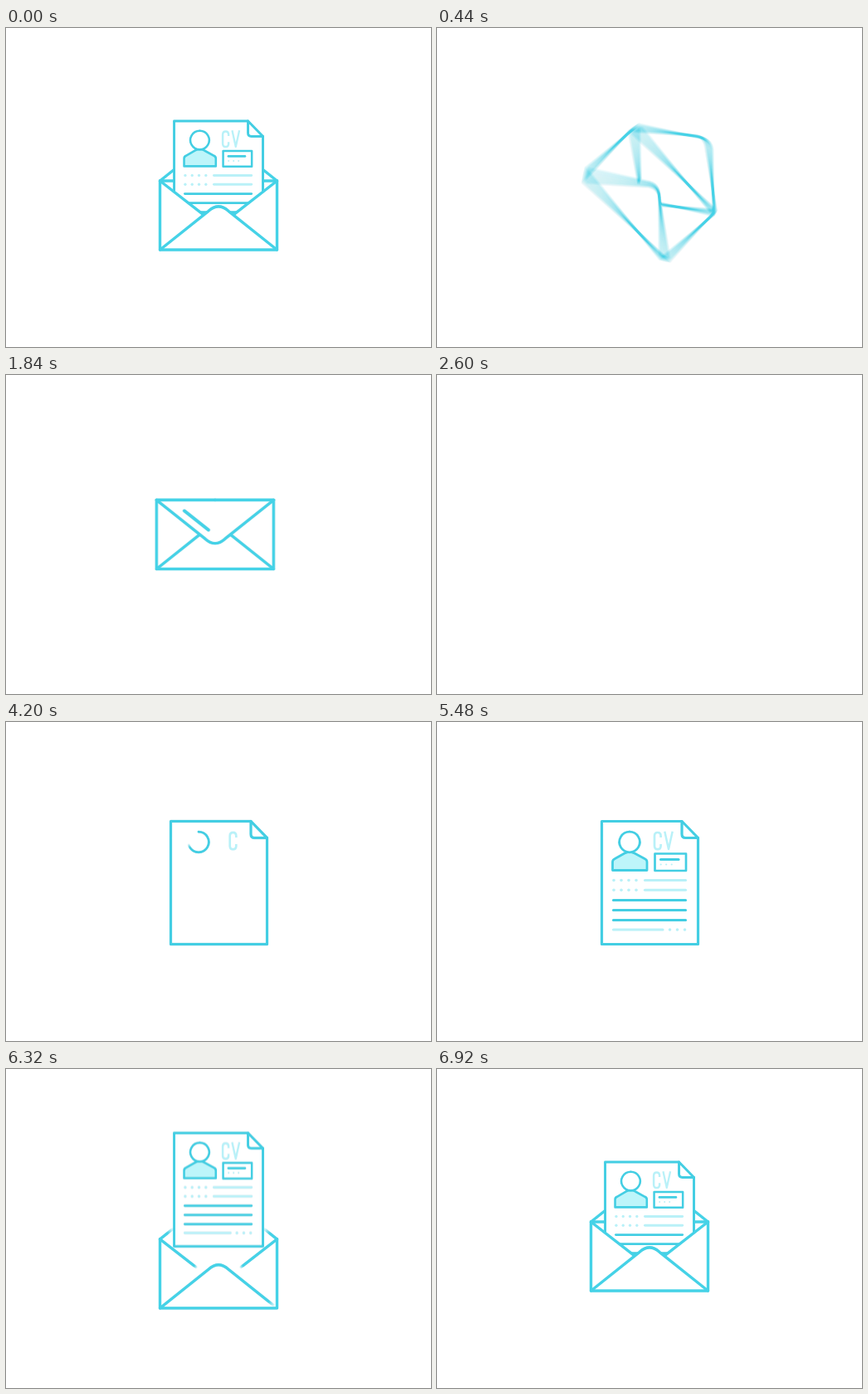
Write an HTML page with a canvas that moves like this. It is 512 px wide and 384 px high and loops after 7000 ms.

```html
<!DOCTYPE html>
<html lang="en">
<head>
<meta charset="utf-8">
<title>CV by mail</title>
<style>
html, body { margin: 0; width: 100%; height: 100%; overflow: hidden; background: #fff; }
canvas { display: block; width: 512px; height: 384px; }
</style>
</head>
<body>
<canvas id="stage" width="512" height="384"></canvas>
<script>
const W = 512, H = 384, LOOP = 7000;
const SHUTTER = 20, SAMPLES = 16;
const MAIN = '#43cee3', LIGHT = '#b9f1f8', FILL = '#bdf5fa', ENV = '#45d2e7';

const stage = document.getElementById('stage');
const ratio = Math.max(1, window.devicePixelRatio || 1);
stage.width = W * ratio;
stage.height = H * ratio;
const out = stage.getContext('2d');
const layer = document.createElement('canvas');
layer.width = stage.width;
layer.height = stage.height;
const g = layer.getContext('2d');

const clamp = v => Math.min(1, Math.max(0, v));
const ramp = (t, from, to) => clamp((t - from) / (to - from));
const cubic = u => u < .5 ? 4 * u ** 3 : 1 - 4 * (1 - u) ** 3;

// Smooth monotone curve through [time, value] keys.
function curve(...keys) {
  const n = keys.length;
  const slope = i => (keys[i + 1][1] - keys[i][1]) / (keys[i + 1][0] - keys[i][0]);
  const tangent = keys.map((_, i) => {
    if (i === 0 || i === n - 1) return 0;
    const a = slope(i - 1), b = slope(i);
    return a * b <= 0 ? 0 : 2 * a * b / (a + b);
  });
  return t => {
    if (t <= keys[0][0]) return keys[0][1];
    if (t >= keys[n - 1][0]) return keys[n - 1][1];
    let i = 0;
    while (t > keys[i + 1][0]) i++;
    const d = keys[i + 1][0] - keys[i][0], u = (t - keys[i][0]) / d;
    const e = u * u * (3 - 2 * u);
    return keys[i][1] * (1 - e) + keys[i + 1][1] * e +
      d * (tangent[i] * u * (1 - u) ** 2 - tangent[i + 1] * u * u * (1 - u));
  };
}

function shape(d) {
  const el = document.createElementNS('http://www.w3.org/2000/svg', 'path');
  el.setAttribute('d', d);
  return { path: new Path2D(d), len: el.getTotalLength() };
}

function fill(s, color) {
  g.fillStyle = color;
  g.fill(s.path);
}

// Strokes the first part p of a shape.
function stroke(s, color, width, p = 1, cap = 'round') {
  if (p <= 0) return;
  g.strokeStyle = color;
  g.lineWidth = width;
  g.lineCap = cap;
  g.lineJoin = 'round';
  g.setLineDash(p < 1 ? [s.len * p, s.len * 2] : []);
  g.stroke(s.path);
  g.setLineDash([]);
}

function dot(x, y, r, color, p) {
  if (p <= 0) return;
  g.fillStyle = color;
  g.beginPath();
  g.arc(x, y, r * p, 0, Math.PI * 2);
  g.fill();
}

// ---- the page ----
const sheet = shape('M198.5 267.5H314.5V139.5L295 119.5H198.5Z');
const fold = shape('M295 119.5V135Q295 139.5 299.5 139.5H314.5');
const head = shape('M232 132.2a12.3 12.3 0 1 1-.01 0');
const torso = shape('M211.5 178.5V168.5Q211.5 166 214 164.8L226 158Q232 154.5 238 158L250.5 164.8Q253 166 253 168.5V178.5Z');
const letterC = shape('M269.6 139V137.2Q269.6 133 265.8 133Q262 133 262 137.2V149Q262 153.2 265.8 153.2Q269.6 153.2 269.6 149V147');
const letterV = shape('M274.3 131.8L279 153L283.7 131.8');
const card = shape('M262.5 158.5H300V179H262.5Z');
const line = (x1, x2, y) => shape(`M${x1} ${y}H${x2}`);

const rules = [
  [line(269.5, 291, 165.5), MAIN, 4520],
  [line(250.5, 299.5, 190.5), LIGHT, 4640],
  [line(250.5, 299.5, 202.2), LIGHT, 4720],
  [line(212.5, 299.5, 214.5), MAIN, 4800],
  [line(212.5, 299.5, 226.5), MAIN, 4880],
  [line(212.5, 299.5, 238.5), MAIN, 4960],
  [line(212.5, 272, 250), LIGHT, 5040]
];
// x, y, gap, count, radius, start
const dotRows = [
  [269.7, 171.5, 6.5, 3, 1.1, 4600],
  [213, 190.5, 9, 4, 1.8, 4560],
  [213, 202.2, 9, 4, 1.8, 4640],
  [280.5, 250, 9, 3, 1.8, 5180]
];

const pageTop = curve([0, 112], [80, 110], [330, 242], [3340, 179], [3700, 152],
  [4040, 129.5], [4200, 119.5], [4760, 117], [5480, 119.5], [5540, 119.5], [6060, 66],
  [6200, 69.5], [6320, 77], [6480, 100], [6680, 112], [7000, 112]);
const pageScale = curve([5540, 1], [5960, .922]);

function drawPage(t) {
  const done = t < 340;
  const grow = (from, time) => done ? 1 : ramp(t, from, from + time);
  const k = done ? .922 : pageScale(t);
  g.save();
  g.translate(256.5 - (1 - k) * 6, pageTop(t));
  g.scale(k, k);
  g.translate(-256.5, -119.5);

  fill(sheet, '#fff');
  stroke(sheet, MAIN, 3.2, grow(3345, 640));
  stroke(fold, MAIN, 3.2, grow(3900, 220));

  const body = grow(4230, 300);
  g.globalAlpha = grow(4450, 160);
  fill(torso, FILL);
  g.globalAlpha = 1;
  stroke(torso, MAIN, 2.8, body);
  if (body > 0) fill(head, '#fff');
  stroke(head, MAIN, 2.8, grow(4013, 280));

  const both = done || t >= 4290;
  if (done || t >= 4140) {
    g.save();
    if (!both) g.translate(7.7, 0);
    stroke(letterC, LIGHT, 2.7, 1, 'butt');
    g.restore();
  }
  if (both) stroke(letterV, LIGHT, 2.5, 1, 'butt');

  stroke(card, MAIN, 2.7, grow(4330, 280));
  for (const [s, color, from] of rules) stroke(s, color, 3.1, grow(from, 260));
  for (const [x, y, gap, count, r, from] of dotRows)
    for (let i = 0; i < count; i++) dot(x + i * gap, y, r, LIGHT, grow(from + i * 50, 100));
  g.restore();
}

// ---- the envelope, around its own centre ----
const flapPath = 'M-70.5 -41.5L-12 5.2Q0 16 12 5.2L70.5 -41.5';
const tray = shape('M-70.5 -41.5V41.5H70.5V-41.5');
const front = shape('M-70.5 -41.5L0 14.7L70.5 -41.5V41.5H-70.5Z');
const sides = [shape('M-70.5 -41.5L-18 -.7'), shape('M70.5 -41.5L18 -.7')];
const bottomFlap = shape('M-70.5 41.5L-12 -5.2Q0 -16 12 -5.2L70.5 41.5');
const topFlap = shape(flapPath);
const flapHalves = [shape('M-70.5 -41.5L-12 5.2Q-6 10.6 0 10.6'), shape('M70.5 -41.5L12 5.2Q6 10.6 0 10.6')];
const rims = [shape('M-70.5 -41.5H0'), shape('M70.5 -41.5H0')];
const shine = shape('M-37 -28.5L-8 -5.5');

const jump = curve([0, 225.5], [40, 225.5], [190, 232], [320, 226], [620, 156],
  [680, 154], [760, 163], [920, 192], [1000, 192]);
const lift = curve([6310, 246.5], [6480, 234], [6680, 225.5]);
const pull = curve([1480, 256], [1720, 255], [1840, 252], [1960, 205], [2080, 162]);
const flapTurn = curve([480, -1], [680, 1]);
const widen = curve([5860, 1.27], [6100, 1.25], [6200, 1.18], [6310, 1]);

function pose(t) {
  if (t > 3000) return { x: 256, y: lift(t), turn: 0, wide: widen(t), flap: -1 };
  return {
    x: t < 2080 ? pull(t) : 162 + 2.5e-4 * (t - 2080) ** 2.3,
    y: jump(t),
    turn: cubic(ramp(t, 160, 1040)) * Math.PI * 2,
    wide: 1,
    flap: flapTurn(t)
  };
}

function drawFlap(k, p) {
  g.save();
  g.translate(0, -41.5);
  g.scale(1, Math.abs(k) < .02 ? .02 : k);
  g.translate(0, 41.5);
  fill(topFlap, '#fff');
  for (const s of flapHalves) stroke(s, ENV, 3.4, p);
  g.restore();
}

function drawMail(t) {
  const e = pose(t);
  const grow = (from, to) => t < 3000 ? 1 : ramp(t, from, to);
  const hasPage = t < 340 || t > 3000;

  const local = draw => {
    g.save();
    g.translate(e.x, e.y);
    g.rotate(e.turn);
    g.scale(e.wide, 1);
    draw();
    g.restore();
  };

  local(() => {
    if (e.flap < 0) drawFlap(e.flap, grow(6290, 6470));
    for (const s of rims) stroke(s, ENV, 3.4, grow(6350, 6540));
  });

  if (hasPage) {
    g.save();
    g.translate(e.x, e.y);
    g.rotate(e.turn);
    g.translate(-e.x, -e.y);
    g.beginPath();
    g.rect(0, 0, W, e.y + 41.5);
    g.clip();
    drawPage(t);
    g.restore();
  }

  local(() => {
    fill(front, '#fff');
    for (const s of sides) stroke(s, ENV, 3.4, grow(6110, 6374));
    fill(bottomFlap, '#fff');
    stroke(bottomFlap, ENV, 3.4, grow(5980, 6340));
    stroke(tray, ENV, 3.4, grow(5870, 6220));
    if (e.flap >= 0) {
      drawFlap(e.flap, 1);
      for (const s of rims) stroke(s, ENV, 3.4);
      stroke(shine, ENV, 4, ramp(t, 1480, 1780));
    }
  });
}

function scene(t) {
  g.setTransform(ratio, 0, 0, ratio, 0, 0);
  g.fillStyle = '#fff';
  g.fillRect(0, 0, W, H);
  if (t < 2600 || t >= 5865) drawMail(t);
  else if (t >= 3345) drawPage(t);
}

// Averages several moments for motion blur.
function render(t) {
  for (let i = 0; i < SAMPLES; i++) {
    const s = t + ((i + .5) / SAMPLES - .5) * SHUTTER;
    scene((s + LOOP) % LOOP);
    out.globalAlpha = 1 / (i + 1);
    out.drawImage(layer, 0, 0);
  }
}

const begin = performance.now();
function tick() {
  const t = (performance.now() - begin) % LOOP;
  render(Math.floor(t / 40) * 40);
  requestAnimationFrame(tick);
}
tick();
</script>
</body>
</html>
```
